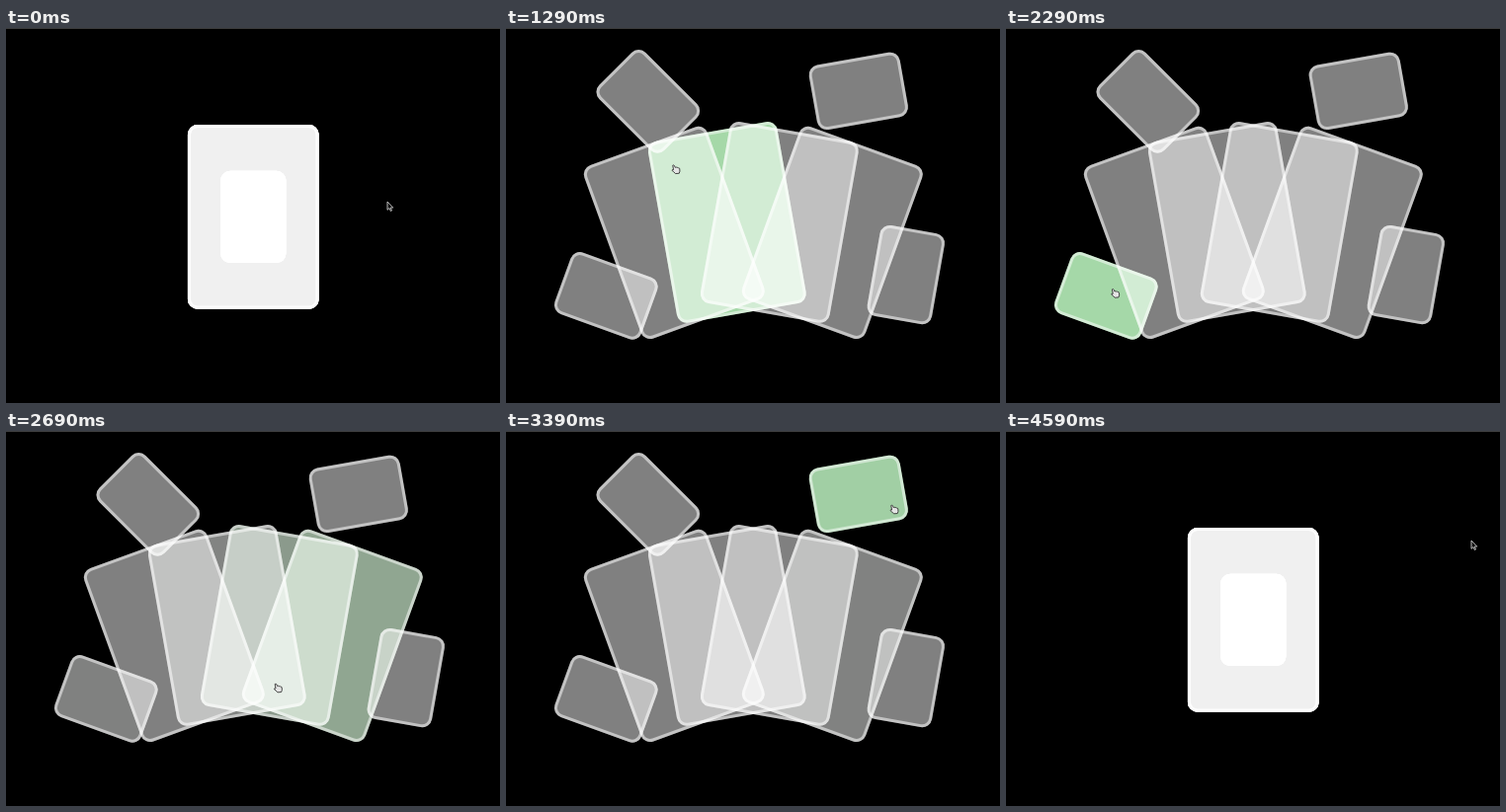
An HTML page for the animation above (4.79 s loop, 500x380 px).

```html
<!DOCTYPE html>
<html lang="en">
<head>
<meta charset="utf-8">
<title>Card fan</title>
<style>
  html, body { margin: 0; width: 100%; height: 100%; overflow: hidden; background: #000; }
  svg { display: block; width: 100%; height: 100%; isolation: isolate; }
  .card { mix-blend-mode: screen; }
</style>
</head>
<body>
<svg viewBox="0 0 500 380">
  <rect width="500" height="380" fill="#000"/>
  <rect width="500" height="1" fill="#3c3c3c"/>
  <g id="deck"></g>
  <path id="arrow" d="M0 0V9.3L2.2 7.3L3.7 10.6L5 10L3.6 6.8H6.4Z" fill="#111" stroke="#ccc"/>
  <path id="hand" d="M-3.6-4.6Q-2.3-5.6-1.6-4.1L-.8-2.2Q.4-3.2 1-2.1Q2.2-2.8 2.7-1.6Q4.2-1.9 4.2-.6L4.4 2L3.6 4.4L-.6 4.7L-2.6 2.6L-4.4 1.2Q-4.4-.4-2.7.4Z" fill="#e4e4e4" stroke="#333" stroke-linejoin="round"/>
</svg>
<script>
const LOOP = 4790, OPEN = 150, CLOSE = 4020, MOVE = 330, FADE = 250;
const CX = 250.3, CY = 191.4, W = 132.7, H = 186.7;
const GREY = [128, 128, 128], GREEN = [165, 216, 168];
const NS = 'http://www.w3.org/2000/svg';
const $ = id => document.getElementById(id);
const mix = (a, b, p) => a + (b - a) * p;

// the fan mirrors around the middle, the small cards lie scattered
const fan = [-2, -1, 1, 2].map(k => ({
  w: W, h: H, dx: 53.5 * k - 27 * Math.sign(k), dy: 10.5 * Math.abs(k) - 5, turn: 10 * k
}));
const small = (dx, dy, turn) => ({ w: W / 2, h: H / 2, dx, dy, turn });
const cards = [
  ...fan,
  small(-106.5, -117, -45), small(-149, 80, -70),
  small(106.5, -127.5, 80), small(154.5, 58.7, 10)
];

// key points of the pointer: time, x, y
const track = [
  [0, 386, 176], [150, 312, 181], [490, 268, 183], [590, 251, 183],
  [1090, 185, 170], [1190, 185, 170], [1490, 146, 90], [1890, 168, 195],
  [2090, 110, 269], [2390, 111, 269], [2890, 385, 255], [3090, 380, 239],
  [3240, 390, 85], [3490, 395, 76], [3990, 395, 76], [4190, 478, 100],
  [4590, 471, 111], [LOOP, 471, 111]
];

// cubic-bezier(.25, .1, .25, 1)
function ease(x) {
  if (x <= 0) return 0;
  if (x >= 1) return 1;
  let lo = 0, hi = 1, s;
  for (let i = 0; i < 18; i++) {
    s = (lo + hi) / 2;
    if (.75 * s - .75 * s * s + s ** 3 < x) lo = s; else hi = s;
  }
  const r = 1 - s;
  return .3 * r * r * s + 3 * r * s * s + s ** 3;
}

const spreadAt = t => ease((t - OPEN) / MOVE) - ease((t - CLOSE) / MOVE);

function pointerAt(t) {
  const i = track.findIndex(k => k[0] > t);
  const [t0, x0, y0] = track[i - 1], [t1, x1, y1] = track[i];
  const p = (t - t0) / (t1 - t0);
  return [mix(x0, x1, p), mix(y0, y1, p)];
}

// topmost card under the pointer, or -1
function hitAt(t) {
  const [x, y] = pointerAt(t), s = spreadAt(t);
  return cards.findLastIndex(({ w, h, dx, dy, turn }) => {
    const a = turn * s * Math.PI / 180, c = Math.cos(a), d = Math.sin(a);
    const u = x - CX - dx * s, v = y - CY - dy * s;
    return Math.abs(u * c + v * d) < w / 2 && Math.abs(v * c - u * d) < h / 2;
  });
}

const hovers = [];
for (let t = 0, last = -1; t < LOOP; t += 5) {
  const id = hitAt(t);
  if (id !== last) hovers.push([t, last = id]);
}

// how green a card is, fading from wherever the last fade had got to
function glow(card, t) {
  let from = 0, goal = 0, start = 0;
  const level = now => mix(from, goal, ease((now - start) / FADE));
  for (const [at, id] of hovers) {
    if (at > t) break;
    const next = id === card ? 1 : 0;
    if (next !== goal) {
      from = level(at);
      goal = next;
      start = at;
    }
  }
  return level(t);
}

function add(parent, tag, attrs) {
  const el = document.createElementNS(NS, tag);
  for (const k in attrs) el.setAttribute(k, attrs[k]);
  return parent.appendChild(el);
}

const box = (w, h, inset) => ({
  x: inset - w / 2, y: inset - h / 2,
  width: w - 2 * inset, height: h - 2 * inset, rx: 10 - inset
});

for (const card of cards) {
  card.g = add($('deck'), 'g', { class: 'card' });
  card.face = add(card.g, 'rect', box(card.w, card.h, 0));
  add(card.g, 'rect', {
    ...box(card.w, card.h, 1.5),
    fill: 'none', stroke: '#fff', 'stroke-width': 3, 'stroke-opacity': .53
  });
}

function draw(t) {
  const s = spreadAt(t);
  cards.forEach(({ g, face, dx, dy, turn }, i) => {
    g.setAttribute('transform',
      `translate(${CX + dx * s} ${CY + dy * s}) rotate(${turn * s})`);
    const p = glow(i, t);
    face.setAttribute('fill', `rgb(${GREY.map((c, k) => Math.round(mix(c, GREEN[k], p)))})`);
  });
  const [x, y] = pointerAt(t), over = hitAt(t) >= 0;
  for (const [id, on] of [['arrow', !over], ['hand', over]]) {
    $(id).setAttribute('transform', `translate(${x} ${y}) scale(.9)`);
    $(id).style.display = on ? '' : 'none';
  }
}

// ten pictures a second, with one short step at 590 ms
function step(t) {
  const shift = t < 590 ? 0 : 90;
  return Math.min(4590, Math.floor((t - shift) / 100) * 100 + shift);
}

const begin = performance.now();
function tick() {
  draw(step((performance.now() - begin) % LOOP));
  requestAnimationFrame(tick);
}
tick();
</script>
</body>
</html>
```
